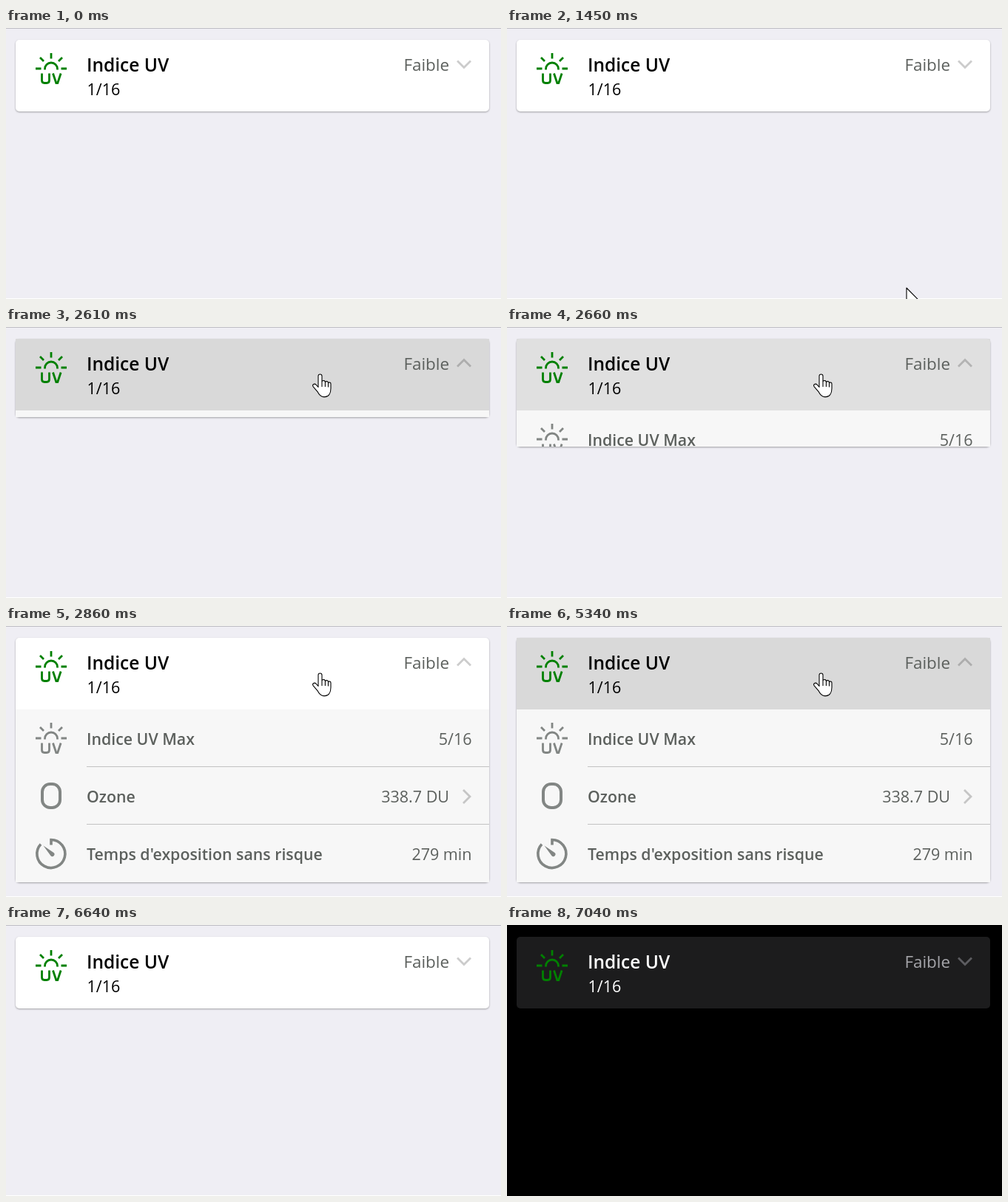
These frames come from a looping animation (669x367 px, 8 s). An HTML page:

```html
<!DOCTYPE html>
<html lang="fr">
<head>
<meta charset="utf-8">
<title>Indice UV</title>
<style>
  html, body { margin: 0; width: 100%; height: 100%; overflow: hidden; }
  svg {
    --page: #efeef4; --edge: #fff; --line: #bfbec4; --card: #fff; --title: #000;
    --muted: #5c605d; --chevron: #0003; --shadow: #0005;
    display: block; background: var(--page);
    font: 21.5px "Open Sans", "Noto Sans", sans-serif;
  }
  svg.dark {
    --page: #000; --edge: #000; --line: #000; --card: #1c1c1d; --title: #fff;
    --muted: #a5a5aa; --chevron: #5c5c60; --shadow: transparent;
  }
  #card { fill: var(--card); filter: drop-shadow(0 1.5px 1.2px var(--shadow)); }
  .title { fill: var(--title); }
  .muted { fill: var(--muted); }
  .label { font-size: 21.3px; }
  .title.bold, .label { font-weight: 600; }
  .title.bold { font-size: 24.5px; }
  .end { text-anchor: end; }
  .icon, .chevron { fill: none; stroke-width: 2.8; }
  .chevron { stroke: var(--chevron); }
  .cursor { fill: #fff; stroke: #000; stroke-width: 1.1; stroke-linejoin: round; }
</style>
</head>
<body>
<svg id="stage" width="669" height="367" viewBox="0 0 669 367">
  <defs>
    <clipPath id="cardClip"><rect class="cardShape" x="13" y="16" width="640" height="97"/></clipPath>
    <path id="uv" d="M61 34v7.5M40 55h7.5M74.500 55h7.500M46 40l5 5M76 40l-5 5M52.500 56.500v-1a8.500 8.500 0 0 1 17 0v1M48.500 61.500v9.500q0 3.500 3.500 3.500h3q3.500 0 3.500-3.500v-9.500M63.500 61.500l4.300 13h2l4.300-13"/>
  </defs>

  <rect width="669" height="1" fill="var(--line)"/>
  <rect y="366" width="669" height="1" fill="var(--edge)"/>
  <rect id="card" class="cardShape" x="13" y="16" width="640" height="97" rx="5"/>

  <g clip-path="url(#cardClip)">
    <g id="details">
      <rect x="13" y="113" width="640" height="234" fill="#f7f7f7"/>
      <path d="M109 190.500H653M109 268.500H653" stroke="#c3c3c3"/>
      <g class="icon" stroke="#828684">
        <use href="#uv" y="97"/>
        <rect x="49" y="214" width="24" height="32" rx="10.500" stroke-width="4"/>
        <path d="M61 296.500V289.500A19 19 0 1 1 47 295.500" stroke-width="3.600"/>
        <path d="M50.500 297.500l14 9.500a2.800 2.800 0 0 1-4 4.300z" fill="#828684" stroke="none"/>
      </g>
      <g class="muted">
        <text class="label" x="109" y="161">Indice UV Max</text>
        <text class="label" x="109" y="239">Ozone</text>
        <text class="label" x="109" y="317">Temps d'exposition sans risque</text>
        <g class="end">
          <text x="629.500" y="161">5/16</text>
          <text x="599" y="239">338.7 DU</text>
          <text x="629.500" y="317">279 min</text>
        </g>
      </g>
      <path class="chevron" d="M618 222l9 9-9 9"/>
    </g>
    <rect id="highlight" x="13" y="16" width="640" height="97" fill="#d9d9d9"/>
    <use href="#uv" class="icon" stroke="#008000"/>
    <text class="title bold" x="109" y="59">Indice UV</text>
    <text class="title" x="109.500" y="91">1/16</text>
    <text class="muted end" x="599" y="58" font-size="22.400">Faible</text>
    <path id="toggle" class="chevron"/>
  </g>

  <g id="pointer" class="cursor">
    <path id="arrow" d="M0 0v25l5.800-5.500 4 9 4-1.800-4-8.700h8z"/>
    <path id="hand" d="M-3 2.500a2.500 2.500 0 0 1 5 0v8a2.200 2.200 0 0 1 4.400.6a2.100 2.100 0 0 1 4.100.8a1.900 1.900 0 0 1 3.500 1.200v6c0 7-3 11.500-8 11.500h-2c-4 0-6-3-8-7l-6-7c-1.500-3 2-4.500 4-2.500l3 3.400zM2 10.500v6.500M6.400 11.100v6M10.500 11.900v5.500"/>
  </g>
</svg>
<script>
const LOOP = 8000;
const OPEN_STEPS = [2610, 2660, 2727, 2793, 2860];
const CLOSE_STEPS = [5340, 5470, 5552, 5634, 5716, 5798, 5880];
const $ = id => document.getElementById(id);
const clamp = p => Math.min(1, Math.max(0, p));
const progress = (t, from, to) => clamp((t - from) / (to - from));
const smooth = p => p * p * (3 - 2 * p);
const mix = (a, b, p) => a + (b - a) * p;
const show = (el, on) => el.setAttribute("visibility", on ? "visible" : "hidden");

// Hold t at the latest step reached, or 0 before the first one.
const held = (t, steps) => steps.filter(s => s <= t).pop() || 0;

function drawCard(t) {
  const opening = held(t, OPEN_STEPS), closing = held(t, CLOSE_STEPS);
  const opened = smooth(progress(opening, 2577, 2860)) - smooth(progress(closing, 5440, 5780));
  for (const shape of document.querySelectorAll(".cardShape"))
    shape.setAttribute("height", 97 + Math.round(234 * opened));
  show($("details"), opened > 0);

  const pressed = closing ? 1 - progress(closing, 5460, 5880)
    : opening ? 1 - progress(opening, 2610, 2860) : 0;
  $("highlight").setAttribute("opacity", pressed);
  const up = t >= OPEN_STEPS[0] && t < CLOSE_STEPS[1];
  $("toggle").setAttribute("d", up ? "M610 53.500l9-9 9 9" : "M610 44.500l9 9 9-9");
}

function drawPointer(t) {
  const visible = t >= 1450 && t < 6640;
  const enter = clamp(Math.floor((t - 1450) / 68) / 10);
  const leave = t < 6210 ? 0 : (Math.floor((t - 6210) / 71.7) + 1) / 6;
  const arrive = enter * (2 - enter);
  const x = Math.round(t < 6210 ? mix(540, 425, arrive) : mix(425, 586, leave));
  const y = Math.round(t < 6210 ? mix(352, 64, arrive) : mix(64, 350, leave));
  $("pointer").setAttribute("transform", `translate(${x} ${y})`);
  show($("hand"), visible && y < 113);
  show($("arrow"), visible && y >= 113);
}

function frame(now) {
  const t = now % LOOP;
  $("stage").classList.toggle("dark", t >= 7040);
  drawCard(t);
  drawPointer(t);
  requestAnimationFrame(frame);
}
frame(0);
</script>
</body>
</html>
```
